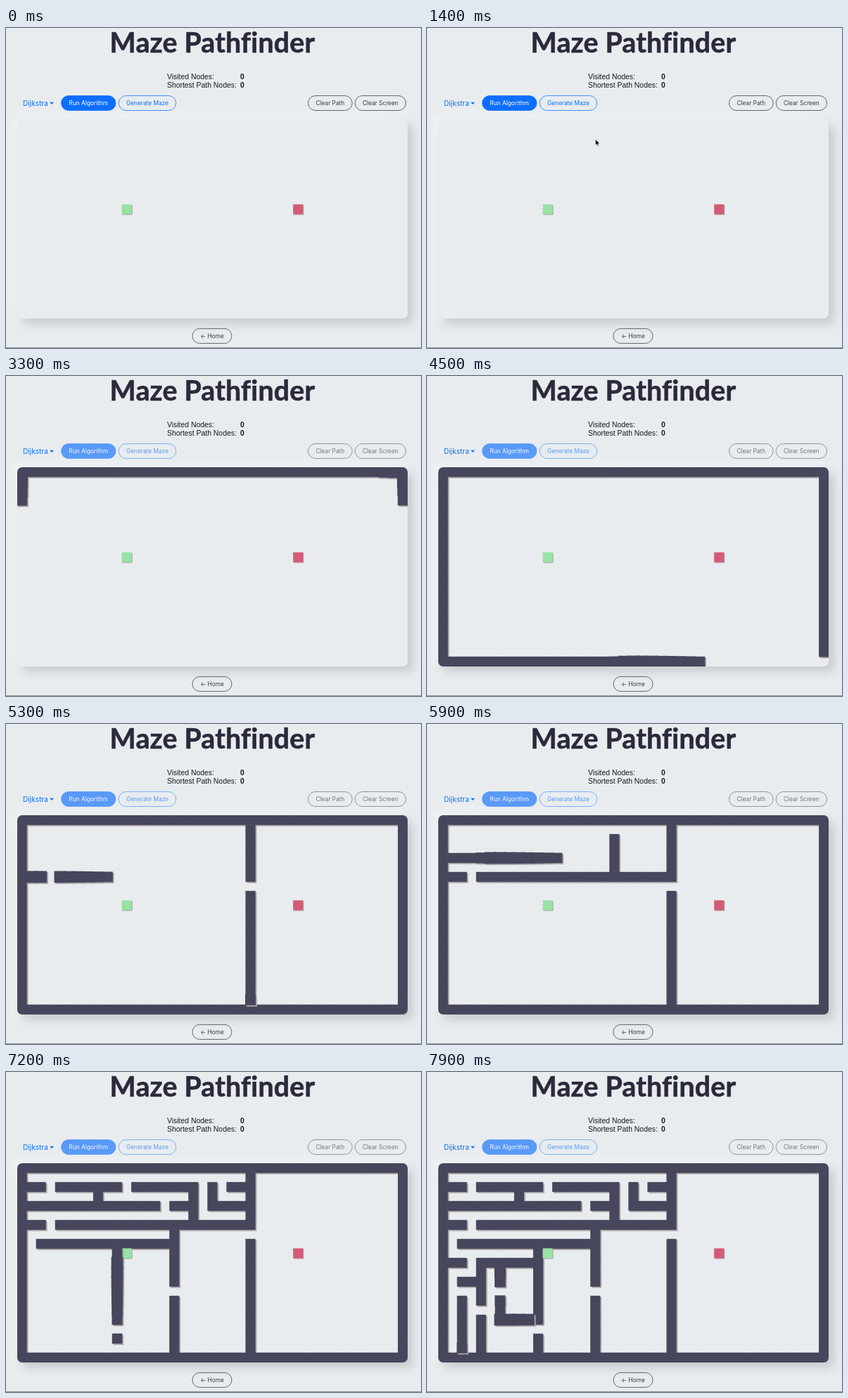
An HTML page with a canvas that plays this animation: 590x456 px, repeating every 8000 ms.

```html
<!DOCTYPE html>
<html lang="en">
<head>
<meta charset="utf-8">
<title>Maze Pathfinder</title>
<style>
  html, body { margin: 0; width: 590px; height: 456px; overflow: hidden; background: #e8ecef; }
  svg, canvas, #board { position: absolute; left: 0; top: 0; }
  #board, canvas { left: 16px; top: 130px; width: 555px; height: 284px; border-radius: 7px; }
  #board { background: #e9ecee; box-shadow: 8px 8px 14px #c8cccf, -7px -7px 13px #eff2f4; }
  text { font: 8.3px Inter, sans-serif; }
  .title {
    font: 700 39.3px Lato, sans-serif; font-variant-ligatures: none; letter-spacing: .2px;
    fill: #2b2a3c; stroke: #2b2a3c; stroke-width: .6px;
  }
  .stats text { font: 10.4px "Liberation Sans", Arial, sans-serif; fill: #16181b; }
  .stats .num { font-weight: 700; }
  .button text { text-anchor: middle; }
  .button rect { fill: none; stroke: currentColor; stroke-width: .75; }
  .button text { fill: currentColor; }
  .blue { color: #0d6efd; }
  .dark { color: #343a40; }
  #run rect { fill: #0d6efd; }
  #run text { fill: #fff; }
</style>
</head>
<body>
<div id="board"></div>
<canvas id="maze" width="555" height="284"></canvas>
<svg width="590" height="456">
  <text class="title" x="293.5" y="34.8" text-anchor="middle">Maze Pathfinder</text>
  <g class="stats">
    <text x="229" y="72.7">Visited Nodes:</text><text class="num" x="333" y="72.7">0</text>
    <text x="229" y="84.7">Shortest Path Nodes:</text><text class="num" x="333" y="84.7">0</text>
  </g>
  <text x="24" y="111" style="font-size:10.1px" fill="#0d6efd">Dijkstra</text>
  <path d="M62 105.7h6l-3 3.2z" fill="#0d6efd"/>
  <g id="buttons"></g>
  <path d="M0 455.5H590" stroke="#8b8e91"/>
  <path id="cursor" d="M0 0v8.2l1.9-1.7 1.3 2.9 1.4-.6-1.3-2.8h2.6z" fill="#000" stroke="#fff" stroke-width=".5"/>
</svg>
<script>
const LOOP = 8000, CLICK = 2300, HOVER = 1600;
const CELL_W = 555 / 41, CELL_H = 13.5;
const WALL = '#46465c', SHADOW = '#aca5a8';
const $ = id => document.getElementById(id);
const clamp = v => Math.max(0, Math.min(1, v));

// id, label, left, top, width, colour class
const buttons = [
  ['run', 'Run Algorithm', 78.5, 96.5, 77.5, 'blue'],
  ['generate', 'Generate Maze', 160.2, 96.5, 81.5, 'blue'],
  ['clearPath', 'Clear Path', 429.5, 96.5, 62.7, 'dark'],
  ['clearScreen', 'Clear Screen', 496.2, 96.5, 72.3, 'dark'],
  ['home', '← Home', 265, 428.4, 56, 'dark'],
];
$('buttons').innerHTML = buttons.map(([id, label, x, y, w, color]) =>
  `<g id="${id}" class="button ${color}">
    <rect x="${x}" y="${y}" width="${w}" height="21" rx="10.5"/>
    <text x="${x + w / 2}" y="${y + 13.5}">${label}</text>
  </g>`).join('');

// Border first, then the recursive divisions in the order they are built.
const cells = [];
const add = (col, row) => cells.push({ col, row, color: WALL, depth: 1.8 });
for (let c = 0; c <= 40; c++) add(c, 0);
for (let r = 1; r < 20; r++) { add(0, r); add(40, r); }
for (let c = 0; c <= 40; c++) add(c, 20);

function divide(axis, at, from, to, gap) {
  for (let k = from; k <= to; k++)
    if (k !== gap) axis === 'col' ? add(at, k) : add(k, at);
}
[
  ['col', 24, 1, 19, 7],
  ['row', 6, 1, 23, 3],
  ['col', 18, 1, 5, 1],
  ['row', 4, 1, 17, 15],
  ['col', 8, 1, 3, 1],
  ['row', 2, 1, 7, 3],
  ['row', 2, 9, 17, 11],
  ['row', 4, 19, 23, 19],
  ['col', 20, 1, 3, 1],
  ['row', 2, 21, 23, 21],
  ['col', 16, 7, 19, 13],
  ['row', 8, 1, 15, 1],
  ['col', 10, 9, 19, 17],
  ['row', 10, 1, 9, 3],
  ['col', 4, 11, 19, 15],
  ['row', 12, 1, 3, 1],
  ['col', 2, 13, 19, 13],
  ['row', 16, 5, 9, 5],
  ['col', 6, 11, 15, 13],
].forEach(wall => divide(...wall));

// One cell about every 20 ms, slowing slightly near the end.
cells.forEach((cell, i) => cell.born = 2365 + i * 20.12 + Math.max(0, i - 206) * 1.1);
cells.push({ col: 11, row: 9, color: '#98e2a6', depth: 1, born: -1e4 },
           { col: 29, row: 9, color: '#d45b75', depth: 1, born: -1e4 });

const GROW = 160, SETTLE = 190;
function scaleAt(age) {
  if (age < GROW) return 1 + 0.2 * (1 - (1 - age / GROW) ** 2);
  return 1.2 - 0.2 * clamp((age - GROW) / (SETTLE - GROW));
}

const ctx = $('maze').getContext('2d');
function drawCell(cell, scale, color, offset = 0) {
  const w = CELL_W * scale, h = CELL_H * scale;
  ctx.fillStyle = color;
  ctx.fillRect((cell.col + .5) * CELL_W - w / 2 + offset - .4,
               (cell.row + .5) * CELL_H - h / 2 + offset - .2, w + .6, h + .6);
}

// Shadows lie under all faces of the same layer.
function drawLayer(layer, t) {
  const scale = c => scaleAt(t - c.born);
  layer.forEach(c => drawCell(c, scale(c), SHADOW, c.depth));
  layer.forEach(c => drawCell(c, scale(c), c.color));
}

function drawMaze(t) {
  ctx.clearRect(0, 0, 555, 284);
  drawLayer(cells.filter(c => t - c.born >= SETTLE), t);
  drawLayer(cells.filter(c => t >= c.born && t - c.born < SETTLE), t);
}

function drawControls(t) {
  const disabled = t >= CLICK;
  for (const [id] of buttons.slice(0, 4)) $(id).style.opacity = disabled ? .65 : 1;
  const hover = disabled ? 0 : clamp((t - HOVER) / 150);
  const [rect, label] = $('generate').children;
  rect.style.fill = `rgba(13,110,253,${hover})`;
  label.style.fill = hover > .5 ? '#fff' : '';

  const p = 1 - (1 - clamp((t - 1200) / 500)) ** 2;
  $('cursor').setAttribute('transform', `translate(${300 - 94 * p} ${250 - 142 * p})`);
  $('cursor').style.display = t >= 1200 && t < 2750 ? '' : 'none';
}

function frame() {
  const t = performance.now() % LOOP;
  drawMaze(t);
  drawControls(t);
  requestAnimationFrame(frame);
}
frame();
</script>
</body>
</html>
```
